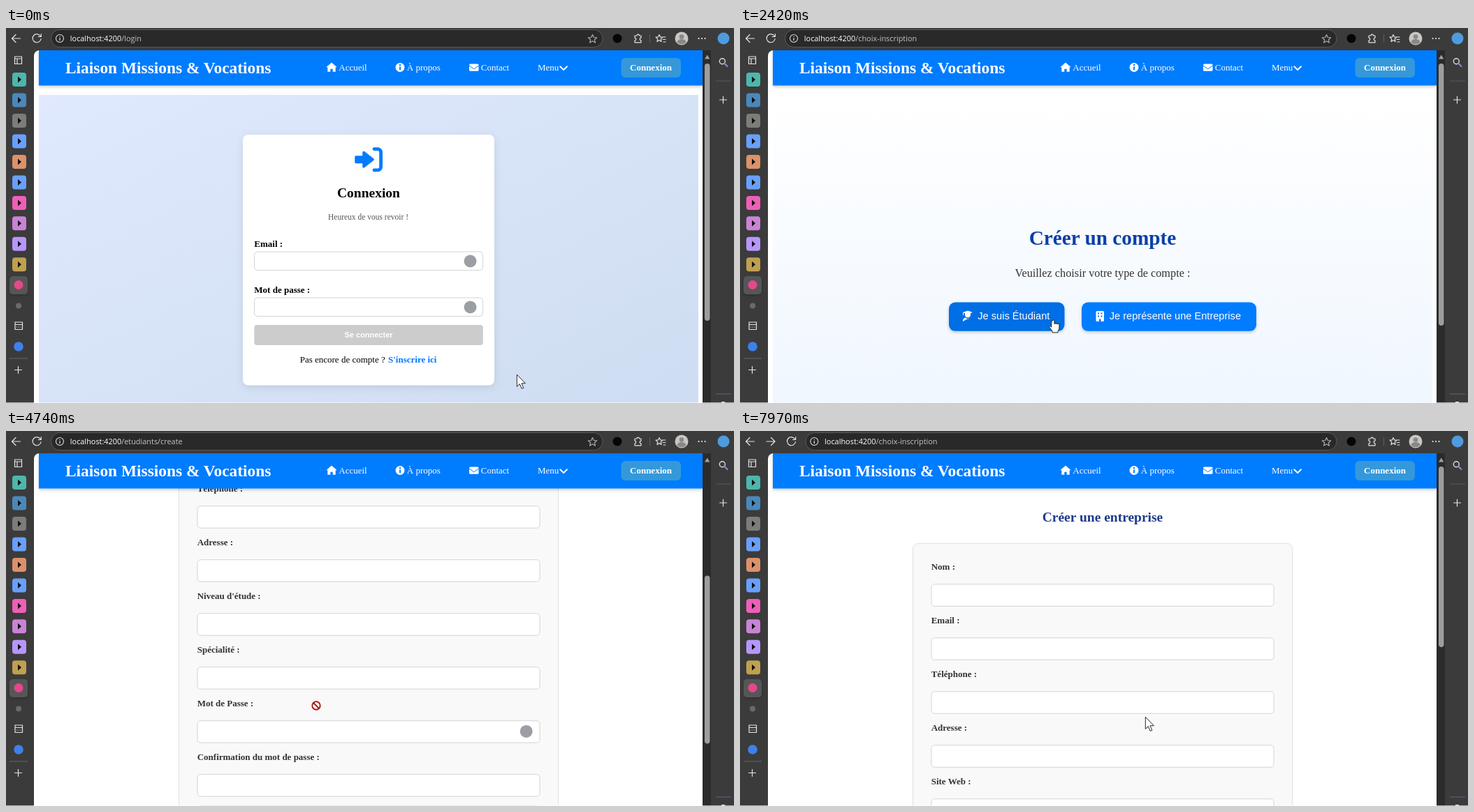
Animation of 1042 by 538 pixels, one loop 8000 ms. Source, as an HTML page:

```html
<!DOCTYPE html>
<html lang="fr">
<head>
<meta charset="utf-8">
<title>Inscription</title>
<style>
html, body { margin: 0; width: 100%; height: 100%; overflow: hidden; background: #3b3b3b; }
svg { display: block; }
text { white-space: pre; font-family: "Liberation Serif", serif; }
.b { font-weight: bold; }
.sans { font-family: "Liberation Sans", sans-serif; }
.ui { font-family: "Open Sans", sans-serif; }
.mid { text-anchor: middle; }
.line { fill: none; stroke: #e4e4e4; stroke-width: 1.2; stroke-linecap: round; stroke-linejoin: round; }
</style>
</head>
<body>
<svg id="stage" width="1042" height="538" viewBox="0 0 1042 538"></svg>
<script>
const BLUE = '#007bff';
const BRAND = 'Liaison Missions &amp; Vocations';

const text = (x, y, str, size, fill, cls = '') =>
  `<text x="${x}" y="${y}" font-size="${size}" fill="${fill}" class="${cls}">${str}</text>`;
const rect = (x, y, w, h, fill, r = 0, more = '') =>
  `<rect x="${x}" y="${y}" width="${w}" height="${h}" rx="${r}" fill="${fill}" ${more}/>`;
const circle = (x, y, r, fill, more = '') => `<circle cx="${x}" cy="${y}" r="${r}" fill="${fill}" ${more}/>`;
const path = (d, fill, more = '') => `<path d="${d}" fill="${fill}" ${more}/>`;
const line = (d, more = '') => `<path d="${d}" class="line" ${more}/>`;
const group = (id, body, more = '') => `<g id="${id}" ${more}>${body}</g>`;
const plus = (x, y) => line(`M${x - 5} ${y}h10M${x} ${y - 5}v10`);
const field = (x, y, w, h) => rect(x + .5, y + .5, w - 1, h - 1, '#fff', 4.5, 'stroke="#d4d4d4"');
const badge = (x, y) => circle(x, y, 9, '#9b9ea3');

function loginPage() {
  return rect(47, 96, 944, 480, 'url(#loginBg)')
    + rect(339, 153, 360, 359.5, '#fff', 8, 'filter="url(#soft)"')
    + path('M501 185h11v-6.5l13 10.2-13 10.2v-6.5h-11z', BLUE, `stroke="${BLUE}" stroke-width="3.5" stroke-linejoin="round"`)
    + path('M527 173.6h5a4.6 4.6 0 0 1 4.6 4.6v21a4.6 4.6 0 0 1-4.6 4.6h-5', 'none', `stroke="${BLUE}" stroke-width="4.8" stroke-linecap="round"`)
    + text(519, 243, 'Connexion', 19.5, '#000', 'b mid')
    + text(518.5, 274.5, 'Heureux de vous revoir !', 11.5, '#555', 'mid')
    + text(355.3, 314, 'Email :', 13, '#000', 'b') + field(355, 320.5, 328, 27.5) + badge(664.5, 334.5)
    + text(355.3, 380, 'Mot de passe :', 13, '#000', 'b') + field(355, 386.5, 328, 27.5) + badge(664.5, 400.5)
    + rect(355.3, 426, 327.5, 29, '#ccc', 4)
    + text(519, 444.3, 'Se connecter', 11, '#fff', 'sans b mid')
    + text(420.7, 479.7, 'Pas encore de compte ?', 13, '#000')
    + text(547, 479.7, "S'inscrire ici", 13, BLUE, 'b')
    + rect(547, 481.2, 70, 1, BLUE, 0, 'id="underline"');
}

function choicePage() {
  const button = (id, x, w) => rect(x, 393.5, w, 41.3, BLUE, 9, `id="${id}" filter="url(#lift)"`);
  return rect(47, 96, 944, 480, 'url(#choiceBg)')
    + text(519, 311, 'Créer un compte', 29.25, '#0a3fa8', 'b mid')
    + text(519, 357, 'Veuillez choisir votre type de compte :', 16.25, '#333', 'mid')
    + button('student', 299, 165.5) + button('company', 489, 250)
    + path('M319 408l7-2.6 7 2.6-3 1.2v2a3.9 3.9 0 0 1-8 0v-2l-2-.7v3.5h-1zM319 421c0-4 2-5.6 4.5-5.6l2.5 2.6 2.5-2.6c2.500 4.500 1.600 4.500 5.600z', '#fff')
    + text(340.300, 418.300, 'Je suis Étudiant', 14.6, '#fff', 'sans')
    + rect(509.500, 406, 11.500, 15, '#fff', 1.5)
    + path('M512 408.500h2v2h-2zM516.500 408.500h2v2h-2zM512 412.500h2v2h-2zM516.500 412.500h2v2h-2zM514 417.500h2.500v3.500h-2.500z', BLUE)
    + text(528.800, 418.300, 'Je représente une Entreprise', 14.6, '#fff', 'sans');
}

function formPage(title, labels, height) {
  let s = text(519, 130, title, 19.5, '#1e3a8a', 'b mid')
    + rect(247.5, 161.5, 543, height, '#f9f9f9', 7, 'stroke="#e0e0e0"');
  labels.forEach((name, i) => {
    s += text(273.7, 199.3 + 77 * i, name + ' :', 13, '#333', 'b') + field(273.5, 219.3 + 77 * i, 491, 32.5);
  });
  return s;
}

function studentForm() {
  const labels = ['Nom', 'Prenom', 'Email', 'Téléphone', 'Adresse', "Niveau d'étude", 'Spécialité',
    'Mot de Passe', 'Confirmation du mot de passe'];
  return formPage('Créer un étudiant', labels, 781) + badge(744.7, 774)
    + rect(273.7, 880.5, 490.600, 36, '#94a3b8', 5)
    + text(519, 903, 'Créer', 13, '#fff', 'sans mid')
    + rect(47, 976, 944, 140, BLUE)
    + text(519, 1014, `© 2025 ${BRAND} - Tous droits réservés.`, 11.1, '#fff', 'mid')
    + [['Accueil', 435], ['|', 482], ['À propos', 496], ['|', 551], ['Contact', 564]]
      .map(([s, x]) => text(x, 1039.5, s, 11.4, '#fff', 'b')).join('');
}

function siteHeader() {
  return rect(47, 32, 950, 50.5, BLUE, 0, 'filter="url(#lift)"')
    + text(85, 65, BRAND, 23.4, '#fff', 'b')
    + path('M466 49.500l7.700 6.800h-2v6.500h-4v-4h-3.400v4h-4v-6.500h-2z', '#fff')
    + text(476.3, 61.3, 'Accueil', 13, '#fff')
    + circle(564, 56.500, 6.500, '#fff') + rect(563.1, 55.4, 1.9, 5, BLUE) + circle(564, 53, 1.2, BLUE)
    + text(573.8, 61.3, 'À propos', 13, '#fff')
    + rect(663, 51.500, 13.500, 10.300, '#fff', 1.600)
    + path('M663 54l6.700 4.800 6.800-4.800', 'none', `stroke="${BLUE}"`)
    + text(679.800, 61.300, 'Contact', 13, '#fff')
    + text(761, 61.3, 'Menu', 13, '#fff')
    + path('M793.300 55.300l4.800 4.800 4.800-4.800', 'none', 'stroke="#fff" stroke-width="2" stroke-linecap="round" stroke-linejoin="round"')
    + rect(880.500, 43, 85.500, 28, '#3498db', 6)
    + text(923, 61.300, 'Connexion', 13, '#fff', 'b mid');
}

function toolbar() {
  const star = (x, y) => `M${x} ${y - 6}l1.800 4 4.400.4-3.300 2.900 1 4.300-3.900-2.300-3.900 2.300 1-4.300-3.300-2.900 4.400-.4z`;
  return rect(2, 3, 26, 25, '#555', 4, 'id="backHover"')
    + line('M20.500 15H8.500M14 9.500L8.500 15l5.500 5.500')
    + line('M38 15h12M44.500 9.500l5.500 5.500-5.500 5.500', 'id="forward"')
    + rect(64.500, 2.500, 789.500, 25, '#292929', 12.500, 'id="pill" stroke="#5a5a5a"')
    + group('shift', line('M49.500 12a6 6 0 1 0 .6 3.500M50.300 8.500v4h-4')
      + circle(77, 15, 5.500, 'none', 'stroke="#ddd" stroke-width="1.100"') + line('M77 14.500v3M77 12.300v.1')
      + `<text x="91.800" y="19.300" font-size="10.900" fill="#fff" class="ui">localhost:4200<tspan id="route" fill="#c4c4c4"></tspan></text>`)
    + line(star(839.500, 15.500), 'stroke-opacity=".7"')
    + circle(875, 15, 6.500, '#050505')
    + line('M900 11h3a1.800 1.800 0 0 1 3.600 0h2.400v3.200a1.800 1.800 0 0 0 0 3.600v3h-9v-3a1.800 1.800 0 0 0 0-3.600z')
    + rect(921, 9, 1, 12, '#5f5f5f')
    + line('M935 9.500l1.500 3.300 3.500.3-2.700 2.500.7 3.900-3-2-3 2 .7-3.900-2.700-2.500 3.500-.3zM940 13h4M940 16.500h4M941 20h3')
    + circle(967, 15, 9.500, '#c9c6c4') + circle(967, 12.500, 3.300, '#8a8886') + path('M960.500 20.500a6.500 4.500 0 0 1 13 0a9 9 0 0 1-13 0z', '#8a8886')
    + [991.500, 996, 1000.500].map(x => circle(x, 15, 1.100, '#eee')).join('')
    + circle(1027, 15, 8.500, '#4f9be0');
}

function sidebars() {
  const tabs = ['#4db6ac', '#4a88bb', '#7c7c79', '#699ffb', '#dc916a', '#699ffb', '#ee5fb7', '#c983d6', '#b796fb', '#bfa050'];
  return line('M12.500 41h10v10.500h-10zM12.500 44h10M16 44v7')
    + tabs.map((c, i) => {
      const y = 74 + 29.480 * i;
      return rect(9, y - 10, 20, 20, c, 4) + path(`M17 ${y - 4.500}l5 4.500-5 4.500z`, '#111');
    }).join('')
    + rect(5, 356, 26, 26, '#565656', 5, 'filter="url(#lift)"') + circle(18, 368.500, 6.500, '#e4488c')
    + circle(18, 398.500, 4, '#6a6a6a')
    + line('M13 422h10.500v10.500h-10.500zM13 425.500h10.500M15.500 429h.1M18.300 429h.1M21 429h.1')
    + circle(18, 457, 6.800, '#3f80ea')
    + rect(5, 473.500, 26, 1, '#666') + plus(17.500, 490.500)
    + rect(997, 32, 12, 506, '#2b2b2b') + path('M1000 44.500l3.700-6 3.700 6z', '#a0a0a0')
    + rect(1000, 51, 7.500, 369, '#9d9d9d', 3.700, 'id="thumb"')
    + circle(1025.300, 47.800, 4, 'none', 'stroke="#ddd" stroke-width="1.400"') + line('M1028.500 51l4 4', 'style="stroke:#a87be0;stroke-width:2"')
    + rect(1016, 75.500, 22, 1, '#5a5a5a') + plus(1026.500, 103)
    + rect(1016, 524.500, 22, 1, '#66608c') + rect(1024, 536, 5, 1.500, '#ddd');
}

const pointers = {
  arrow: path('M.3.3v17.200l4-3.800 2.900 6.700 2.600-1.100-2.800-6.500h5.400z', '#fff', 'stroke="#111" stroke-width=".9"'),
  hand: path('M-1.500 1.200v9l-1.800-1.500c-1.500-.3-1.700 1.200-.8 2.200l3.900 5v2h8v-2c1.500-2 1.900-3.600 1.900-6V6.300c0-1.500-2-1.500-2.200 0 0-1.700-2.300-1.700-2.400-.3 0-1.700-2.400-1.700-2.400-.3V1.200c0-1.700-2.500-1.700-2.500 0z', '#fff', 'stroke="#111" stroke-width=".9"'),
  beam: path('M-2.500-7h2l.5.500.5-.5h2M0-6.500v13M-2.500 7h2l.5-.5.500.5h2', 'none', 'stroke="#222"'),
  denied: circle(0, 0, 5.700, '#fff', 'stroke="#a61c14" stroke-width="1.900"') + path('M-4-4l8 8', 'none', 'stroke="#a61c14" stroke-width="1.900"')
};

const gradient = (id, dir, a, b) =>
  `<linearGradient id="${id}" ${dir}><stop stop-color="${a}"/><stop offset="1" stop-color="${b}"/></linearGradient>`;
const shadow = (id, dy, blur, alpha) =>
  `<filter id="${id}" x="-20%" y="-20%" width="140%" height="150%"><feDropShadow dx="0" dy="${dy}" stdDeviation="${blur}" flood-opacity="${alpha}"/></filter>`;

document.getElementById('stage').innerHTML =
  `<defs>${gradient('loginBg', 'x1="0" y1="0" x2="1" y2="1"', '#e0e9fd', '#cddcf1')}
  ${gradient('choiceBg', 'x1="0" y1="0" x2="0" y2="1"', '#fff', '#eef6ff')}
  ${shadow('soft', 3, 6, .1)}${shadow('lift', 2, 2, .2)}
  <clipPath id="view"><path d="M40 538V40a8 8 0 0 1 8-8H997V538z"/></clipPath></defs>`
  + rect(0, 0, 1042, 538, '#3b3b3b') + toolbar()
  + `<g clip-path="url(#view)">` + rect(40, 32, 957, 506, '#fff')
  + group('login', loginPage()) + group('choice', choicePage())
  + group('studentPage', studentForm())
  + group('companyPage', formPage('Créer une entreprise', ['Nom', 'Email', 'Téléphone', 'Adresse', 'Site Web'], 720))
  + siteHeader() + '</g>' + sidebars()
  + rect(0, 537, 1042, 1, '#fff', 0, 'opacity=".6"')
  + group('pointer', Object.entries(pointers).map(([k, v]) => group(k, v)).join(''));

const $ = id => document.getElementById(id);
const set = (id, name, value) => $(id).setAttribute(name, value);
const show = (id, on) => set(id, 'display', on ? 'inline' : 'none');
const ramp = (t, start, span) => Math.min(1, Math.max(0, (t - start) / span));
const ease = u => u * u * (3 - 2 * u);
const within = (t, a, b) => t >= a && t < b;

// time, x, y
const track = [
  [40, 731, 497], [300, 702, 500], [860, 592, 481], [930, 592, 472], [1700, 592, 472], [2050, 540, 424],
  [2490, 430, 418], [3460, 430, 418], [3700, 444, 394], [5000, 444, 394], [5500, 368, 100], [5970, 4, 9],
  [6080, 4, 9], [6250, 7, 11], [6700, 7, 11], [6800, 53, 20], [7100, 400, 260], [7350, 555, 397], [7600, 580, 410]
];

function pointerAt(t) {
  const i = track.findIndex(k => k[0] > t);
  if (i === 0) return track[0].slice(1);
  if (i < 0) return track[track.length - 1].slice(1);
  const [a, b] = [track[i - 1], track[i]];
  const u = ramp(t, a[0], b[0] - a[0]);
  return [a[1] + (b[1] - a[1]) * u, a[2] + (b[2] - a[2]) * u];
}

function pointerKind(t, x, y, page) {
  if (within(t, 850, 1340) || within(t, 2600, 2850) || within(t, 7400, 7650)) return 'hand';
  if (within(t, 3620, 4130)) return 'beam';
  if (within(t, 4130, 5000)) return 'denied';
  const onButton = within(y, 393, 435) && (within(x, 299, 465) || within(x, 489, 739));
  return page === 'choice' && onButton ? 'hand' : 'arrow';
}

const scrollAt = t => 547 * (ease(ramp(t, 3870, 466)) - ease(ramp(t, 4400, 823)));

// hover tint from the resting blue to the darker one
const tint = u => `rgb(0,${Math.round(123 - 37 * u)},${Math.round(255 - 76 * u)})`;
const thumbSize = { login: 369, choice: 376, studentPage: 241, companyPage: 259 };

function draw(t) {
  const page = t < 1130 ? 'login' : t < 2630 ? 'choice' : t < 6520 ? 'studentPage' : t < 7420 ? 'choice' : 'companyPage';
  const route = t < 1130 ? '/login' : within(t, 3180, 6520) ? '/etudiants/create' : '/choix-inscription';
  for (const id in thumbSize) show(id, id === page);

  const y = page === 'studentPage' ? scrollAt(t) : 0;
  set('studentPage', 'transform', `translate(0 ${-y})`);
  set('studentPage', 'opacity', ease(ramp(t, 2590, 450)));
  set('companyPage', 'opacity', ease(ramp(t, 7380, 450)));
  set('thumb', 'y', 51 + y * .456);
  set('thumb', 'height', thumbSize[page]);

  show('underline', t >= 930);
  set('company', 'fill', tint(ramp(t, 1970, 150) - ramp(t, 2250, 150) + ramp(t, 7340, 150)));
  set('student', 'fill', tint(ramp(t, 2370, 150) - ramp(t, 2700, 1)));

  const forward = t >= 6520;
  show('forward', forward);
  show('backHover', within(t, 5940, 6860));
  set('shift', 'transform', `translate(${forward ? 29.300 : 0} 0)`);
  set('pill', 'x', forward ? 94 : 64.500);
  set('pill', 'width', forward ? 760 : 789.500);
  $('route').textContent = route;

  const [px, py] = pointerAt(t);
  const kind = pointerKind(t, px, py, page);
  set('pointer', 'transform', `translate(${px} ${py})`);
  for (const k in pointers) show(k, k === kind);
}

const start = performance.now();
function tick() {
  draw((performance.now() - start) % 8000);
  requestAnimationFrame(tick);
}
tick();
</script>
</body>
</html>
```
